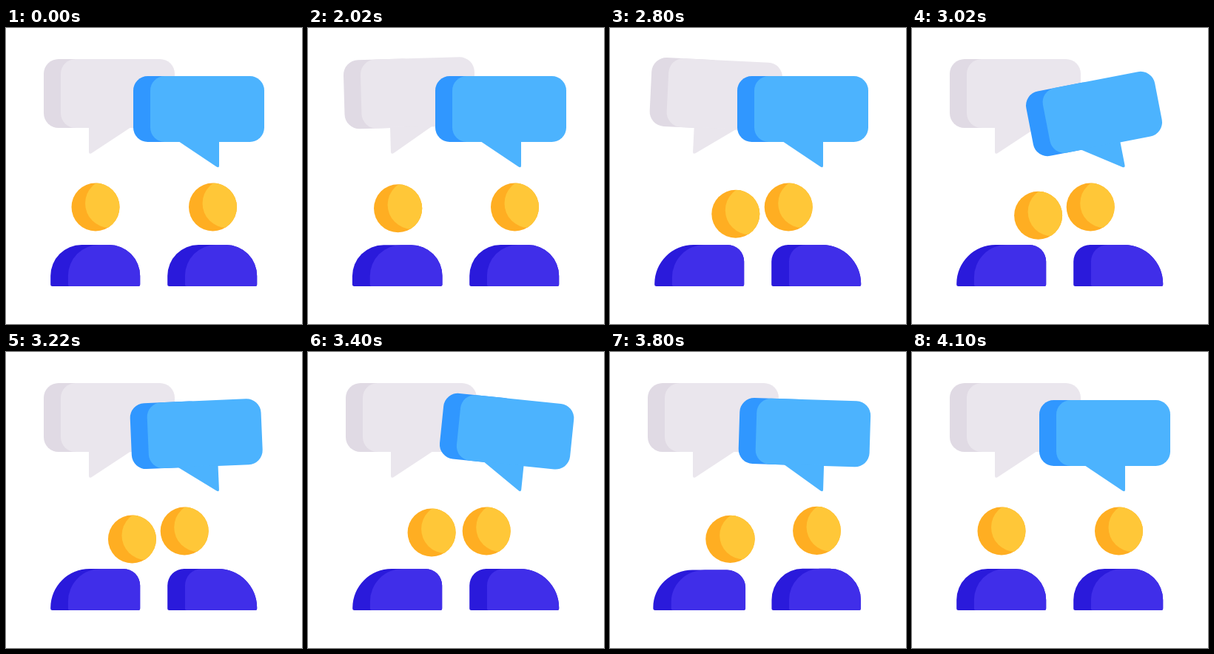
An HTML page that plays this animation: 400 by 400 pixels, repeating every 4120 ms.

```html
<!DOCTYPE html>
<html lang="en">
<head>
<meta charset="utf-8">
<title>Conversation</title>
<style>
  html, body { margin: 0; width: 100%; height: 100%; overflow: hidden; background: #fff; }
  svg { display: block; width: 100%; height: 100%; }
</style>
</head>
<body>
<svg viewBox="0 0 400 400">
  <defs><clipPath id="face"><circle r="32.5"/></clipPath></defs>
  <g id="greyBubble">
    <rect x="51" y="42" width="100" height="93" rx="20" fill="#e0dae4"/>
    <rect x="74" y="42" width="154" height="93" rx="20" fill="#eae6ed"/>
    <path d="M112 134V167.500Q112 171 115.500 169.300L169 134Z" fill="#eae6ed"/>
  </g>
  <g id="blueBubble">
    <rect x="172" y="65" width="100" height="89" rx="19.500" fill="#3097ff"/>
    <rect x="195" y="65" width="154" height="89" rx="19.500" fill="#4cb3fe"/>
    <path d="M233 153L284.500 187.500Q288 189.500 288 186V153Z" fill="#4cb3fe"/>
  </g>
  <g id="left"></g>
  <g id="right"></g>
</svg>
<script>
const LOOP = 4120;
const byId = id => document.getElementById(id);
const mix = (a, b, k) => a + (b - a) * k;
const ease = k => (1 - Math.cos(Math.PI * k)) / 2;

// Eased value at time t through [time, value] pairs.
function track(keys, t) {
  if (t <= keys[0][0]) return keys[0][1];
  for (let i = 1; i < keys.length; i++) {
    const [t0, a] = keys[i - 1], [t1, b] = keys[i];
    if (t < t1) return mix(a, b, ease((t - t0) / (t1 - t0)));
  }
  return keys[keys.length - 1][1];
}

const swing = start => [0, -21, 14.5, -9, 2.8, 0].map((angle, i) => [start + i * 200, angle]);

const bubbles = [
  { node: byId('greyBubble'), pivot: '114 169', keys: swing(1985) },
  { node: byId('blueBubble'), pivot: '287 188', keys: swing(2918) }
];

// A hop squashes, overshoots and settles in three equal steps.
const hop = (start, step) => [0, 1, -0.35, 0].map((v, i) => [start + i * step, v]);

function person(id, o) {
  const node = byId(id);
  node.innerHTML = `
    <g class="body"><path fill="#2a1adb"/><path fill="#402ee9"/></g>
    <g class="head"><circle r="32.5" fill="#ffae22"/>
      <circle cx="19" cy="-5" r="33" fill="#ffc738" clip-path="url(#face)"/></g>`;
  const [out, outStep] = o.out, [back, backStep] = o.back;
  return {
    ...o,
    body: node.querySelector('.body'),
    shapes: node.querySelectorAll('path'),
    head: node.querySelector('.head'),
    squash: [...hop(out, outStep), ...hop(back, backStep)],
    lean: [[out, 0], [out + outStep, 0.117], [out + 2 * outStep, 1],
      [back, 1], [back + backStep, 0.883], [back + 2 * backStep, 0]]
  };
}

const people = [
  person('left', { x: 120.7, home: 121, near: 166.3, side: 1, out: [1994, 120], back: [3720, 125],
    nod: [[2585, 0], [2885, 1], [3185, 1], [3485, 0]] }),
  person('right', { x: 278.7, home: 279.5, near: 241.2, side: -1, out: [2080, 120], back: [3478, 122],
    nod: [[0, 0]] })
];

// Shoulders standing on y = 0, with a separate radius for each side.
function shoulders(x0, x1, rl, rr) {
  const h = 56;
  return `M${x0 + 2.5} 0Q${x0} 0 ${x0} -2.5V${rl - h}A${rl} ${rl} 0 0 1 ${x0 + rl} ${-h}` +
    `H${x1 - rr}A${rr} ${rr} 0 0 1 ${x1} ${rr - h}V-2.5Q${x1} 0 ${x1 - 2.5} 0Z`;
}

function drawPerson(p, t) {
  const q = track(p.squash, t), lean = track(p.lean, t), nod = track(p.nod, t);
  const outer = mix(42, 52.5, lean), inner = mix(42, 22.5, lean);
  const [rl, rr] = p.side > 0 ? [outer, inner] : [inner, outer];
  p.shapes[0].setAttribute('d', shoulders(-60.5, 60.5, rl, rr));
  p.shapes[1].setAttribute('d', shoulders(-36.8, 60.5, Math.min(rl, 44), rr));
  p.body.setAttribute('transform', `translate(${p.x} 349) scale(${1 + 0.042 * q} ${1 - 0.04 * q})`);

  const x = mix(p.home, p.near, lean) + 4.3 * nod;
  const y = 242 + (q > 0 ? 15 : 6) * q + 11.3 * nod;
  p.head.setAttribute('transform', `translate(${x} ${y}) scale(${1 + 0.03 * q} ${1 - 0.02 * q})`);
}

function draw(t) {
  for (const b of bubbles) b.node.setAttribute('transform', `rotate(${track(b.keys, t)} ${b.pivot})`);
  for (const p of people) drawPerson(p, t);
}

const begin = performance.now();
function tick() {
  draw((performance.now() - begin) % LOOP);
  requestAnimationFrame(tick);
}
tick();
</script>
</body>
</html>
```
